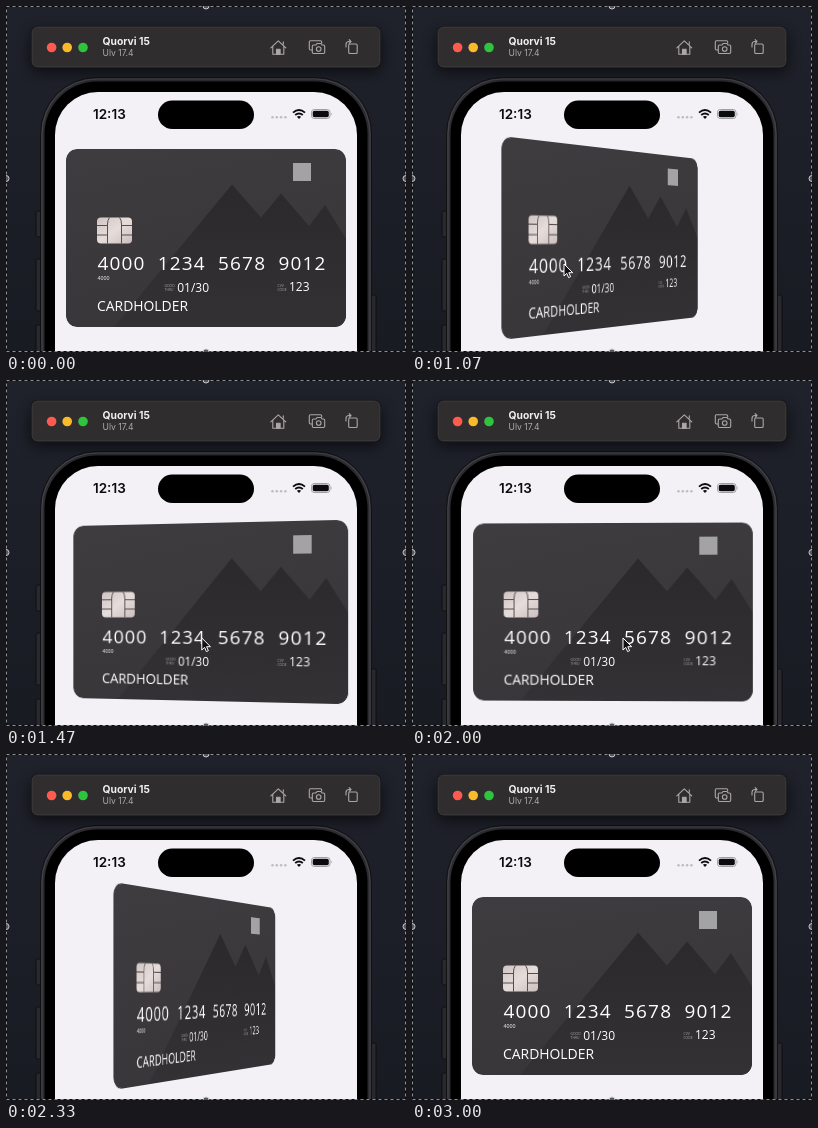
Write an HTML page that moves like this. It is 400 px wide and 346 px high and loops after 3540 ms.

```html
<!DOCTYPE html>
<html lang="en">
<head>
<meta charset="utf-8">
<title>Card flip</title>
<style>
  html, body { margin: 0; width: 100%; height: 100%; overflow: hidden; background: #1c2029; }
  svg { position: absolute; display: block; }
  #stage, #overlay { left: 0; top: 0; width: 400px; height: 346px; }
  #card { left: 60px; top: 143px; width: 280px; height: 178px; border-radius: 11px; }
  .ui { font-family: Inter, Roboto, sans-serif; }
  .print { font-family: "Open Sans", "Noto Sans", sans-serif; fill: #fff; }
  .tiny { font-size: 3.4px; fill: #aaa8aa; }
  .icon { fill: none; stroke: #aaa7a9; stroke-width: 1.1; stroke-linejoin: round; stroke-linecap: round; }
</style>
</head>
<body>
<svg id="stage" viewBox="0 0 400 346">
  <defs>
    <linearGradient id="desk" x2="0" y2="1">
      <stop stop-color="#1f222b"/><stop offset="1" stop-color="#191b23"/>
    </linearGradient>
    <filter id="soft" x="-20%" y="-50%" width="140%" height="200%"><feGaussianBlur stdDeviation="7"/></filter>
  </defs>
  <rect width="400" height="346" fill="url(#desk)"/>

  <!-- phone -->
  <g fill="#29292d" stroke="#0c0c0f" stroke-width=".8">
    <rect x="30" y="205" width="6" height="26" rx="1.5"/>
    <rect x="30" y="253" width="6" height="52" rx="1.5"/>
    <rect x="30" y="319" width="6" height="52" rx="1.5"/>
    <rect x="364" y="289" width="6" height="80" rx="1.5"/>
  </g>
  <rect x="34.5" y="71.5" width="331" height="400" rx="56" fill="#2b2b30" stroke="#111114"/>
  <rect x="36" y="73" width="328" height="400" rx="54.5" fill="none" stroke="#46464c"/>
  <rect x="38.5" y="75.5" width="323" height="400" rx="52.5" fill="#000"/>
  <rect x="49" y="86" width="302" height="400" rx="43" fill="#f3f1f6"/>
  <rect x="152" y="94.5" width="96" height="28.5" rx="14.25" fill="#000"/>
  <text class="ui" x="87" y="113" font-size="13.5" font-weight="600" fill="#0b0b0d">12:13</text>
  <g fill="#bfbdc3">
    <circle cx="266.5" cy="111.3" r="1.3"/><circle cx="270.8" cy="111.3" r="1.3"/>
    <circle cx="275.1" cy="111.3" r="1.3"/><circle cx="279.4" cy="111.3" r="1.3"/>
  </g>
  <g fill="none" stroke="#0b0b0d" stroke-width="1.9">
    <path d="M287 106.6Q293 101.5 299 106.6M289.2 109Q293 105.9 296.8 109"/>
    <path d="M293 113L290.900 110.7Q293 109.2 295.1 110.7Z" fill="#0b0b0d" stroke="none"/>
  </g>
  <rect x="305.5" y="103.5" width="18.5" height="9" rx="2.8" fill="none" stroke="#a09ea4"/>
  <rect x="306.7" y="104.7" width="16.100" height="6.600" rx="1.7" fill="#0b0b0d"/>
  <path d="M325.3 106.5Q327 108 325.3 109.5Z" fill="#a09ea4"/>

  <!-- toolbar -->
  <rect x="24" y="25" width="352" height="42" rx="10" fill="#000" opacity=".55" filter="url(#soft)"/>
  <rect x="25" y="20" width="350" height="42" rx="6.500" fill="#0d0d10"/>
  <rect x="26" y="21" width="348" height="40" rx="5.500" fill="#302d2f" stroke="#454244" stroke-width=".8"/>
  <circle cx="45.600" cy="41.5" r="4.8" fill="#fc5b50"/>
  <circle cx="61.2" cy="41.5" r="4.8" fill="#f9ba2c"/>
  <circle cx="77" cy="41.5" r="4.8" fill="#2ec43d"/>
  <text class="ui" x="96.5" y="39" font-size="10.3" font-weight="700" fill="#f2f0f1">Quorvi 15</text>
  <text class="ui" x="96.5" y="50" font-size="8.6" fill="#aeabad">Ulv 17.4</text>
  <g class="icon">
    <path d="M264.8 41.8L272.3 34.8L279.8 41.8M266.8 40.3V48.3H277.8V40.3M277.3 38.3V35.8"/>
    <path d="M270.500 48.300V43.300H274.100V48.300Z" fill="#aaa7a9"/>
    <path d="M306 44H304.5Q303.3 44 303.3 42.8V36Q303.3 34.8 304.5 34.8H314.5Q315.7 34.8 315.7 36V37"/>
    <path d="M307.5 39H310L311 37.5H315L316 39H317.5Q318.7 39 318.7 40.2V46.3Q318.7 47.5 317.5 47.5H307.5Q306.3 47.5 306.3 46.3V40.2Q306.3 39 307.5 39Z"/>
    <circle cx="312.7" cy="43" r="2.3"/>
    <rect x="342.700" y="38" width="8.5" height="9.5" rx="1.3"/>
    <path d="M340 41V38.5Q340 35.5 343 35.5H344.7M343.200 33.7L345 35.5L343.200 37.3"/>
  </g>
</svg>

<svg id="card" viewBox="60 143 280 178">
  <defs>
    <linearGradient id="face" x2=".3" y2="1">
      <stop stop-color="#3e3c3e"/><stop offset="1" stop-color="#383638"/>
    </linearGradient>
    <linearGradient id="peaks" x2="0" y2="1">
      <stop stop-color="#2b292c"/><stop offset="1" stop-color="#333133"/>
    </linearGradient>
    <linearGradient id="metal" x2="1" y2="1">
      <stop stop-color="#cfc4c3"/><stop offset=".5" stop-color="#e6dddb"/><stop offset="1" stop-color="#cbbfbe"/>
    </linearGradient>
    <clipPath id="round"><rect x="60" y="143" width="280" height="178" rx="11"/></clipPath>
  </defs>
  <g clip-path="url(#round)">
    <rect x="60" y="143" width="280" height="178" fill="url(#face)"/>
    <path d="M108 321L226 178.500L255 211.500L275 187.500L303 220L319 199L341 234V321Z" fill="url(#peaks)"/>
  </g>
  <rect x="287" y="157" width="18" height="18" fill="#a3a2a4"/>
  <rect x="91" y="211.5" width="35" height="26" rx="4" fill="url(#metal)"/>
  <path d="M91 219.500H101.500M91 229H101.500M115.500 219.500H126M115.500 229H126M103.500 211.500Q101.500 214 101.500 218V237.500M113.500 211.500Q115.500 214 115.500 218V237.500" fill="none" stroke="#554e4f"/>
  <g class="print">
    <g font-size="19" letter-spacing="1.15">
      <text x="91.5" y="264">4000</text>
      <text x="151.8" y="264">1234</text>
      <text x="212.1" y="264">5678</text>
      <text x="272.4" y="264">9012</text>
    </g>
    <text x="91.5" y="274" font-size="5.3">4000</text>
    <text x="171.2" y="286" font-size="12">01/30</text>
    <text x="283" y="285" font-size="12">123</text>
    <text x="91" y="305" font-size="13.9">CARDHOLDER</text>
    <text class="tiny" x="158.5" y="281">GOOD</text>
    <text class="tiny" x="158.5" y="285">THRU</text>
    <text class="tiny" x="271.5" y="281">CVV</text>
    <text class="tiny" x="271.5" y="285">CODE</text>
  </g>
</svg>

<svg id="overlay" viewBox="0 0 400 346">
  <path id="cursor" d="M0 0V12L2.8 9.4L4.6 13.6L6.6 12.7L4.8 8.7H8.7Z" fill="#111" stroke="#fff" stroke-linejoin="round"/>
  <rect x=".5" y=".5" width="399" height="345" fill="none" stroke="#08090c"/>
  <rect x=".5" y=".5" width="399" height="345" fill="none" stroke="#8d8f94" stroke-dasharray="3 3"/>
  <g id="handles" fill="#55585e" stroke="#c9cacd"></g>
</svg>

<script>
  const LOOP = 3540, STEP = 1000 / 15, FLIP = 673;
  const card = document.getElementById("card");
  const cursor = document.getElementById("cursor");

  document.getElementById("handles").innerHTML =
    [[200, 0], [0, 172.5], [400, 172.5], [200, 346]]
      .map(([x, y]) => `<circle cx="${x}" cy="${y}" r="3"/>`).join("");

  // time, x, y of the pointer tip
  const path = [
    [60, 402, 82], [330, 320, 118], [530, 230, 162], [600, 153, 250], [730, 147, 258],
    [930, 147, 258], [1067, 152, 258], [1267, 173, 258], [1600, 211, 258], [2130, 211, 258]
  ];

  function pointerAt(t) {
    const i = path.findIndex(point => t < point[0]);
    if (i < 1) return null;
    const [t0, x0, y0] = path[i - 1], [t1, x1, y1] = path[i];
    const k = (t - t0) / (t1 - t0);
    return [x0 + (x1 - x0) * k, y0 + (y1 - y0) * k];
  }

  function flip(t, start) {
    const u = Math.min(1, Math.max(0, (t - start) / FLIP));
    return Math.sin(u * Math.PI / 2) ** 1.1;
  }

  function draw(now) {
    const t = Math.floor((now % LOOP + 5) / STEP) * STEP;

    // turn over, then back; both sides carry the same readable print
    const turn = 180 * (flip(t, 940) - flip(t, 1992));
    const angle = turn > 90 ? turn - 180 : turn;
    card.style.transform = Math.abs(angle) < 0.2 ? "none" : `perspective(800px) rotateY(${angle}deg)`;

    const tip = pointerAt(t);
    cursor.style.display = tip ? "" : "none";
    if (tip) cursor.setAttribute("transform", `translate(${tip})`);
  }

  const begin = performance.now();
  function tick() {
    draw(performance.now() - begin);
    requestAnimationFrame(tick);
  }
  tick();
</script>
</body>
</html>
```
